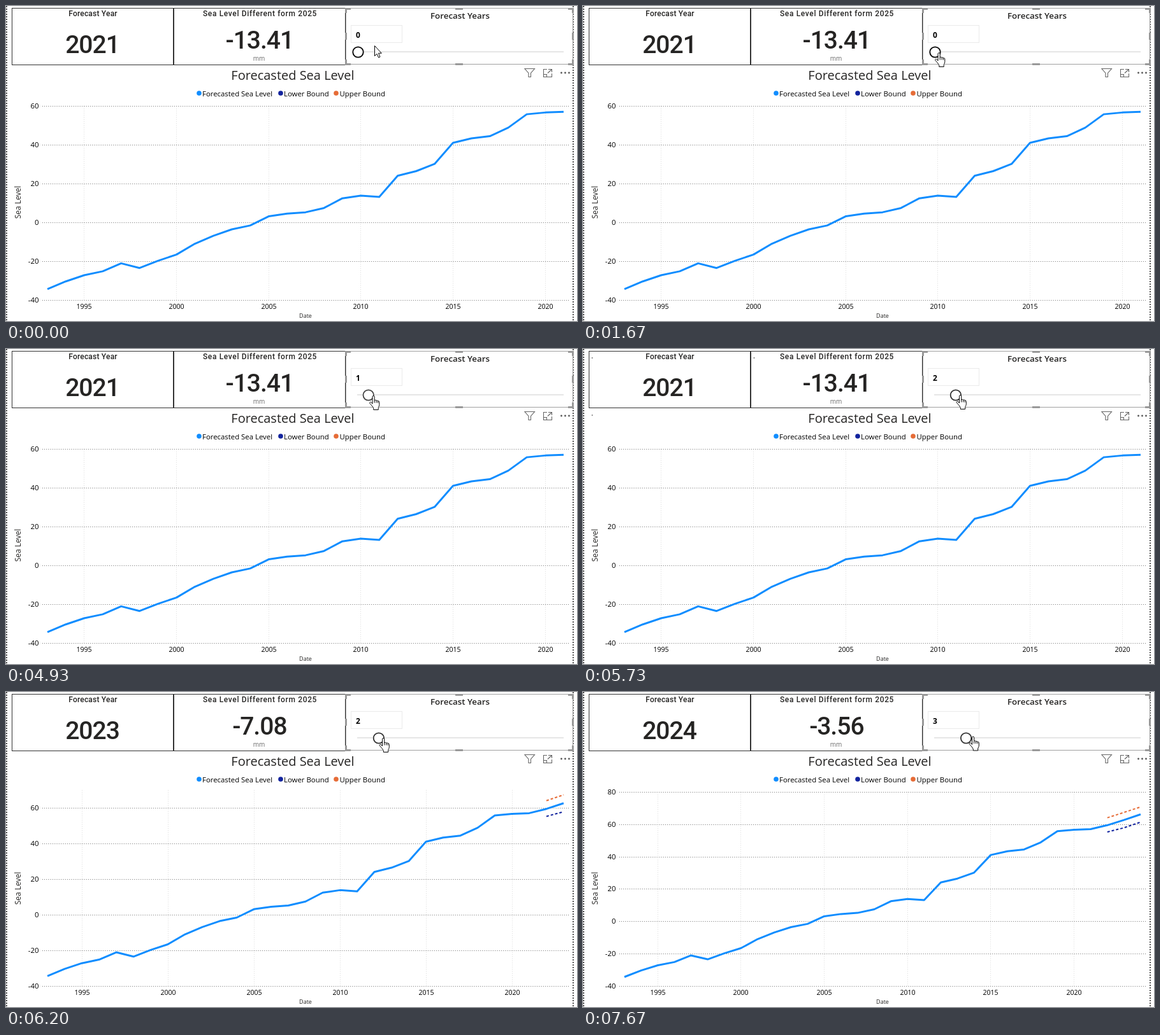
These frames come from a looping animation (896 by 495 pixels, 8000 ms). An HTML page:

```html
<!DOCTYPE html>
<html lang="en">
<head>
<meta charset="utf-8">
<title>Sea level forecast</title>
<style>
  html, body { margin: 0; width: 100%; height: 100%; overflow: hidden; background: #fff; }
  svg { display: block; width: 896px; height: 495px; }
  text { font-family: "Open Sans", "Noto Sans", sans-serif; fill: #252423; }
  .mid { text-anchor: middle; }
  .card { font: 500 12px Roboto, sans-serif; letter-spacing: .2px; }
  .wide { letter-spacing: .65px; }
  .big { font: 500 39px Roboto, sans-serif; letter-spacing: -1px; }
  .legend { font-size: 11.4px; fill: #000; }
  .crisp, .grid line { shape-rendering: crispEdges; }
  .grid line { stroke-dasharray: 1 2; }
  .grid text { font-size: 11.4px; fill: #000; }
  .grid .year { font-size: 10.6px; }
  .h { stroke: #777; }
  .v { stroke: #dcdcdc; }
  .icon { fill: none; stroke: #666; stroke-width: 1.1; }
  .series { fill: none; stroke-linejoin: round; }
  .bound { stroke-width: 2; stroke-dasharray: 4 3; }
  .cursor { fill: #fff; stroke: #000; stroke-linejoin: round; }
</style>
</head>
<body>
<svg viewBox="0 0 896 495">
  <g class="crisp" fill="none">
    <path d="M1 0V495M890 0V495" stroke="#555" stroke-width="2" stroke-dasharray="2 2"/>
    <path d="M9.5 3.5H262.5V92.5H9.5ZM263.5 3.5H532.5V92.5H263.5Z" stroke="#333"/>
    <path d="M533.5 3.5H889.5V91.5H533.5Z" stroke="#a0a0a0"/>
    <path d="M533.5 11V4H541M882 4H889.5V11M889.5 84V91.5H882M541 91.5H533.5V84M705 4H717M705 91.5H717M533.5 42V53M889.5 42V53" stroke="#999" stroke-width="3"/>
    <rect x="541.5" y="30.5" width="80" height="27" stroke="#ebebeb"/>
    <path d="M551 72H875" stroke="#e6e6e6" stroke-width="2"/>
  </g>

  <text class="mid card" x="136.5" y="16">Forecast Year</text>
  <text class="mid card wide" x="398.5" y="16">Sea Level Different form 2025</text>
  <text class="mid big" id="year" x="135.5" y="74"></text>
  <text class="mid big" id="diff" x="398" y="67"></text>
  <text class="mid" x="397" y="86" font-size="10" style="fill:#666">mm</text>
  <text class="mid" x="712.5" y="20" font-size="13.4" font-weight="600">Forecast Years</text>
  <text id="value" x="549" y="49.5" font-size="12" font-weight="700" style="fill:#000"></text>

  <text class="mid" x="450" y="116" font-size="20">Forecasted Sea Level</text>
  <circle cx="303" cy="137" r="3.8" fill="#118DFF"/>
  <circle cx="431" cy="137" r="3.8" fill="#12239E"/>
  <circle cx="518" cy="137" r="3.8" fill="#E66C37"/>
  <text class="legend" x="308" y="142">Forecasted Sea Level</text>
  <text class="legend" x="436" y="142">Lower Bound</text>
  <text class="legend" x="523.5" y="142">Upper Bound</text>

  <g class="icon">
    <path d="M814 98.5H829.5L823.5 105.5V111.5H820V105.5Z"/>
    <path d="M849 99.5H843.5V111.5H856.5V106M851 99.5H856.5V104M856.5 99.5L850 105.5M843.5 107.5H848.5V111.5"/>
  </g>
  <g fill="#555"><circle cx="871.5" cy="105" r="1.4"/><circle cx="877.5" cy="105" r="1.4"/><circle cx="883.5" cy="105" r="1.4"/></g>

  <g class="grid" id="grid"></g>
  <text class="mid" x="470" y="490" font-size="9">Date</text>
  <text class="mid" transform="translate(22.5 308.5) rotate(-90)" font-size="12">Sea Level</text>
  <path class="series" id="level" stroke="#118DFF" stroke-width="3"/>
  <path class="series bound" id="lower" stroke="#12239E"/>
  <path class="series bound" id="upper" stroke="#E66C37"/>

  <g id="busy" fill="#777"><circle cx="14.5" cy="14" r="1"/><circle cx="268.5" cy="14" r="1"/><circle cx="14.5" cy="104" r="1"/></g>
  <circle id="knob" cy="72.5" r="8.2" fill="#fff" stroke-width="1.8"/>
  <path class="cursor" id="arrow" d="M.5 .5V16.5L4 13.2L6.6 19L9 18L6.5 12.2H11.3Z"/>
  <g class="cursor" id="hand">
    <path d="M5.5 13V2.2a1.6 1.6 0 0 1 3.2 0V8c.4-1.2 2.8-1 2.9.4c.5-1 2.5-.7 2.6.7c.6-.7 2.1-.3 2.1 1.2V14.5c0 2.5-1.4 3.5-1.6 5V22.5H7.3V20.3C6.5 17.8 3.5 15 1.3 12.2C.5 10.8 2.5 9.7 3.8 10.9Z"/>
    <path d="M8.7 8v3.6M11.6 8.4v3.2M14.2 9.1v2.7" fill="none"/>
  </g>
</svg>
<script>
const LOOP = 8000, FPS = 15;
const $ = id => document.getElementById(id);

// Yearly readings from 1993, forecast from 2022
const LEVEL = [-34.4, -30.4, -27.2, -25.2, -21.1, -23.5, -19.8, -16.6, -11, -6.9, -3.6,
  -1.6, 3.1, 4.5, 5.2, 7.4, 12.4, 13.8, 13.1, 24, 26.4, 30.1, 41, 43.3, 44.4, 48.8,
  55.7, 56.6, 57, 59.4, 62.6, 66.1];
const SERIES = {
  level: { from: 1993, data: LEVEL },
  lower: { from: 2022, data: [55.2, 57.8, 61.3] },
  upper: { from: 2022, data: [64, 67.3, 70.7] }
};
// k: pixels per mm, at: tick when the view takes over
const VIEWS = [
  { end: 2021, k: 3.05, top: 157, max: 60, diff: '-13.41', at: 0 },
  { end: 2023, k: 2.8, top: 154, max: 60, diff: '-7.08', at: 89 },
  { end: 2024, k: 2.542, top: 157, max: 80, diff: '-3.56', at: 111 }
];
const MORPH = 4;

// Cursor tracks: [tick, x, y]
const ARROW = [[0, 578, 62], [1, 577, 63], [5, 560, 76], [9, 546, 85], [11, 544, 86], [12, 544, 86],
  [15, 543, 87], [17, 544, 89], [20, 552, 77], [22, 558, 79]];
const HAND = [[25, 551.5, 73], [44, 551.5, 73], [45, 556, 73], [47, 559, 73], [48, 559, 73], [53, 563, 73],
  [54, 563, 73], [55, 568.5, 73], [73, 568.5, 73], [74, 569.5, 73], [78, 585, 72], [98, 585, 72],
  [101, 597.5, 71], [110, 597.5, 70.5], [115, 605, 69.5]];
const HAND_AT = 25;

const xAt = (year, v) => 65 + (year - 1993) * 810 / (v.end - 1993);
const yAt = (mm, v) => 462 - (mm + 40) * v.k;
const mix = (a, b, p) => a + (b - a) * p;
const ease = p => p < .5 ? 4 * p ** 3 : 1 - 4 * (1 - p) ** 3;
const within = (n, a, b) => n >= a && n < b;

function along(track, n) {
  const i = track.findIndex(p => p[0] > n);
  if (i < 0) return track[track.length - 1].slice(1);
  if (i === 0) return track[0].slice(1);
  const a = track[i - 1], b = track[i], p = (n - a[0]) / (b[0] - a[0]);
  return [mix(a[1], b[1], p), mix(a[2], b[2], p)];
}

const points = (s, v) => s.data.slice(0, Math.max(0, v.end - s.from + 1))
  .map((mm, i) => [xAt(s.from + i, v), yAt(mm, v)]);

// Points move one to one; added points grow out of the old line's end
function outline(s, v, old, p) {
  let pts = points(s, v);
  if (old && p < 1) {
    const was = points(s, old), dy = v.top - old.top;
    if (was.length) pts = pts.map(([x, y], i) => {
      const [ox, oy] = was[Math.min(i, was.length - 1)];
      return [mix(ox, x, p), mix(oy + dy, y, p)];
    });
    else if (p === 0) pts = [];
  }
  return pts.length ? 'M' + pts.map(q => q.map(c => c.toFixed(2)).join(' ')).join('L') : '';
}

function gridMarkup(v) {
  let out = '';
  for (let year = 1995; year <= 2020; year += 5) {
    const x = Math.floor(xAt(year, v)) + .5;
    out += `<line class="v" x1="${x}" x2="${x}" y1="${v.top}" y2="462"/>` +
      `<text class="mid year" x="${x}" y="476">${year}</text>`;
  }
  for (let mm = -40; mm <= v.max; mm += 20) {
    const y = Math.round(yAt(mm, v));
    out += `<line class="h" x1="57" x2="883" y1="${y + .5}" y2="${y + .5}"/>` +
      `<text x="51.5" y="${y + 4}" text-anchor="end">${mm}</text>`;
  }
  return out;
}

let shown = -1, shownView = null;

function draw(n) {
  const i = n >= VIEWS[2].at ? 2 : n >= VIEWS[1].at ? 1 : 0;
  const v = VIEWS[i];
  if (v !== shownView) {
    $('grid').innerHTML = gridMarkup(v);
    $('year').textContent = v.end;
    $('diff').textContent = v.diff;
    shownView = v;
  }
  const p = ease(Math.min(1, (n - v.at) / MORPH));
  for (const id in SERIES) $(id).setAttribute('d', outline(SERIES[id], v, VIEWS[i - 1], p));

  const value = [51, 76, 100].filter(t => n >= t).length;
  const held = within(n, 36, 83) || within(n, 99, 104);
  $('value').textContent = value;
  $('knob').setAttribute('cx', 552.5 + 16.2 * value);
  $('knob').setAttribute('stroke', n < 36 ? '#000' : held ? '#444' : '#333');
  $('busy').style.display = within(n, 86, 89) || within(n, 106, 111) ? '' : 'none';

  const hand = n >= HAND_AT;
  $('arrow').style.display = hand ? 'none' : '';
  $('hand').style.display = hand ? '' : 'none';
  $(hand ? 'hand' : 'arrow').setAttribute('transform', `translate(${along(hand ? HAND : ARROW, n).join(' ')})`);
}

function frame() {
  const n = Math.floor((performance.now() % LOOP) * FPS / 1000 + .1) % (LOOP * FPS / 1000);
  if (n !== shown) draw(shown = n);
  requestAnimationFrame(frame);
}
frame();
</script>
</body>
</html>
```
